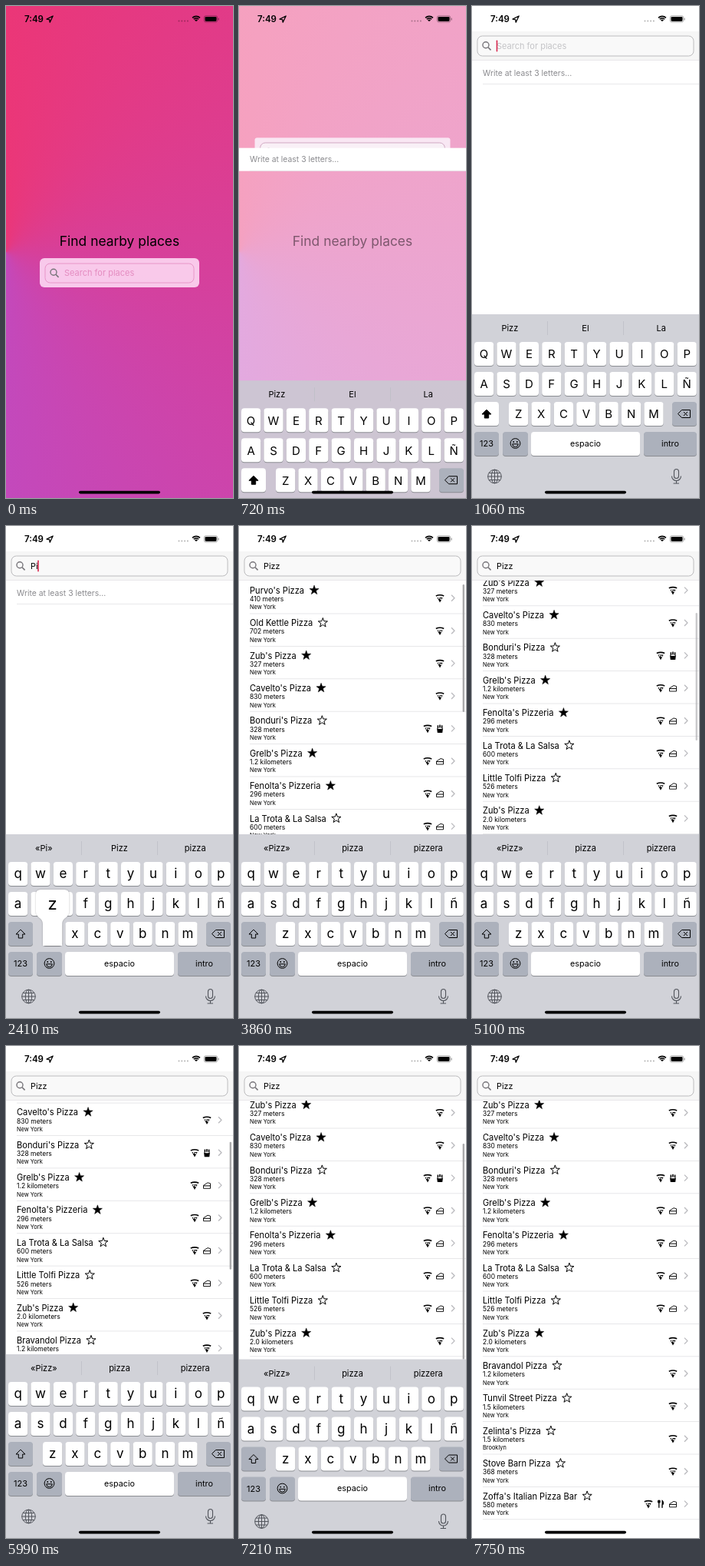
These frames come from a looping animation (296x640 px, 8 s). An HTML page with a canvas:

```html
<!DOCTYPE html>
<html lang="en">
<head>
<meta charset="utf-8">
<title>Nearby places</title>
<style>
html, body { margin: 0; width: 100%; height: 100%; overflow: hidden; background: #fff; }
canvas { display: block; width: 296px; height: 640px; }
</style>
</head>
<body>
<canvas id="stage" width="296" height="640"></canvas>
<script>
const ctx = document.getElementById('stage').getContext('2d');
const W = 296, H = 640, LOOP = 8000, TAU = Math.PI * 2;
const FONT = 'Inter, "Liberation Sans", sans-serif';
const LIST_TOP = 72, ROW = 42.4, KEYS_TOP = 401;
ctx.lineJoin = 'round';

// Periods in which the screen refreshes: start, end, number of updates.
const REFRESH = [
  [500, 1060, 6], [1250, 1950, 7], [2080, 2190, 2], [2410, 2660, 3],
  [2800, 2800, 1], [2950, 2950, 1], [3100, 3300, 3], [3860, 4550, 7],
  [4670, 4900, 3], [5100, 5220, 2], [5760, 6240, 5], [6780, 6900, 2], [7110, 7750, 7]
];

// Name, starred, distance, icons (p pizza, f fries, s sandwich, k cutlery), city.
const PLACES = [
  ["Purvo's Pizza", 1, '410 meters', 'p'],
  ['Old Kettle Pizza', 0, '702 meters', 'p'],
  ["Zub's Pizza", 1, '327 meters', 'p'],
  ["Cavelto's Pizza", 1, '830 meters', 'p'],
  ["Bonduri's Pizza", 0, '328 meters', 'pf'],
  ["Grelb's Pizza", 1, '1.2 kilometers', 'ps'],
  ["Fenolta's Pizzeria", 1, '296 meters', 'ps'],
  ['La Trota & La Salsa', 0, '600 meters', 'ps'],
  ['Little Tolfi Pizza', 0, '526 meters', 'ps'],
  ["Zub's Pizza", 1, '2.0 kilometers', 'p'],
  ['Bravandol Pizza', 0, '1.2 kilometers', 'p'],
  ['Tunvil Street Pizza', 0, '1.5 kilometers', 'p'],
  ["Zelinta's Pizza", 0, '1.5 kilometers', 'p', 'Brooklyn'],
  ['Stove Barn Pizza', 0, '368 meters', 'p'],
  ["Zoffa's Italian Pizza Bar", 0, '580 meters', 'pks']
];

const QUERY = [[0, ''], [1250, 'P'], [2080, 'Pi'], [2530, 'Piz'], [2950, 'Pizz']];
const HINTS = [
  [0, ['Pizz', 'El', 'La']], [1480, ['«P»', 'Pizz', 'Para']], [2080, ['«Pi»', 'Pizz', 'pizza']],
  [2800, ['«Piz»', 'pizza', 'Pizz']], [3100, ['«Pizz»', 'pizza', 'pizzera']]
];
const SCROLL = [[3860, 0], [4200, 40], [4440, 80], [4670, 93.6], [4900, 95],
  [5700, 95], [5880, 115], [6000, 124.7], [6120, 126], [7060, 126], [7200, 91.8]];

const clamp = x => Math.min(1, Math.max(0, x));
const mix = (a, b, p) => a + (b - a) * p;
const ramp = (t, from, to) => clamp((t - from) / (to - from));
const ease = x => x * x * (3 - 2 * x);
const latest = (list, t) => list.filter(e => e[0] <= t).pop()[1];

function track(points, t) {
  const n = points.findIndex(p => p[0] > t);
  if (n === 0) return points[0][1];
  if (n < 0) return points[points.length - 1][1];
  const [a, b] = [points[n - 1], points[n]];
  return mix(a[1], b[1], ramp(t, a[0], b[0]));
}

function refreshTime(t) {
  const span = REFRESH.filter(s => s[0] <= t).pop();
  if (!span) return 0;
  const [from, to, count] = span;
  if (count === 1) return from;
  const gap = (to - from) / (count - 1);
  return from + gap * Math.min(count - 1, Math.floor((t - from + 12) / gap));
}

// y is the middle of the capital letters.
function text(str, x, y, size, color = '#000', align = 'left', weight = 400) {
  ctx.font = `${weight} ${size}px ${FONT}`;
  ctx.textAlign = align;
  ctx.fillStyle = color;
  ctx.fillText(str, x, y + size * 0.36);
}

function box(x, y, w, h, r, fill) {
  ctx.beginPath();
  ctx.roundRect(x, y, w, h, r);
  if (fill) { ctx.fillStyle = fill; ctx.fill(); }
}

function path(points, close) {
  ctx.beginPath();
  points.forEach(([x, y], i) => i ? ctx.lineTo(x, y) : ctx.moveTo(x, y));
  if (close) ctx.closePath();
}

function stroke(color = '#000', width = 1) {
  ctx.strokeStyle = color;
  ctx.lineWidth = width;
  ctx.stroke();
}

function fill(color = '#000') {
  ctx.fillStyle = color;
  ctx.fill();
}

function ring(x, y, r, from = 0, to = TAU) {
  ctx.beginPath();
  ctx.arc(x, y, r, from, to);
}

function at(x, y, draw) {
  ctx.save();
  ctx.translate(x, y);
  draw();
  ctx.restore();
}

function faded(alpha, draw) {
  if (alpha <= 0) return;
  ctx.save();
  ctx.globalAlpha = alpha;
  draw();
  ctx.restore();
}

const icons = {
  p() {
    ctx.beginPath();
    ctx.moveTo(-5.2, -3);
    ctx.quadraticCurveTo(0, -5.4, 5.2, -3);
    stroke('#000', 1.6);
    path([[-3.6, -1], [3.6, -1], [0, 5.6]], true);
    fill();
    for (const [x, y] of [[-1.3, 0.1], [1.2, 0.9]]) { ring(x, y, 1); fill('#fff'); }
  },
  f() {
    path([[-4, -0.6], [-1.6, 0.4], [1.6, 0.4], [4, -0.6], [3.2, 5.3], [-3.2, 5.3]], true);
    fill();
    for (let i = -1; i <= 1; i++) box(i * 2.6 - 0.8, -5 + Math.abs(i) * 0.6, 1.6, 3.8, 0.3, '#000');
  },
  s() {
    path([[-4.5, 0], [1, -3.5], [4.5, -2.5], [4.5, 4], [-4.5, 4]], true);
    stroke('#000', 0.9);
    path([[-4.5, 0.6], [4.5, 0.6]]);
    stroke('#000', 1);
  },
  k() {
    path([[-2.2, -5], [-2.2, 5]]);
    stroke('#000', 1.3);
    box(-4, -5, 3.6, 3.6, 1, '#000');
    path([[2, 5], [2, -5], [3.6, -2.5], [3.4, 0.5], [2, 0.5]], true);
    fill();
    stroke('#000', 0.9);
  }
};

function star(x, y, solid) {
  const points = Array.from({ length: 10 }, (_, i) => {
    const r = i % 2 ? 2.6 : 6.4, a = i * TAU / 10 - TAU / 4;
    return [x + r * Math.cos(a), y + r * Math.sin(a)];
  });
  path(points, true);
  if (solid) fill();
  stroke('#000', solid ? 0.5 : 1);
}

function statusBar() {
  text('7:49', 24, 17, 11.5, '#000', 'left', 600);
  path([[53, 17.2], [61.2, 13], [57.2, 21.2], [56.6, 17.7]], true);
  stroke('#000', 1.3);
  for (let i = 0; i < 4; i++) { ring(225.5 + i * 3.8, 19.5, 1); fill('rgba(0,0,0,.3)'); }
  for (const r of [2, 4.6, 7.2]) {
    ring(248, 20.6, r, -TAU * 0.37, -TAU * 0.13);
    stroke('#000', 1.7);
  }
  box(258.3, 12.7, 17.4, 8.4, 2.5);
  stroke('rgba(0,0,0,.4)', 0.8);
  box(259.5, 13.9, 15, 6, 1.4, '#000');
  box(276.6, 15.4, 1, 3, 0.5, 'rgba(0,0,0,.45)');
}

function backdrop(p) {
  ctx.fillStyle = '#fff';
  ctx.fillRect(0, 0, W, H);
  faded(1 - p, () => {
    const g = ctx.createConicGradient(Math.PI, 0, H / 2);
    g.addColorStop(0, 'rgb(255,45,85)');
    g.addColorStop(1, 'rgb(175,82,222)');
    ctx.fillStyle = g;
    ctx.fillRect(0, 0, W, H);
    text('Find nearby places', W / 2, 305.5, 17.4, '#000', 'center');
  });
}

function searchBar(p, query, caret) {
  const rect = [mix(44, 0, p), mix(328, 33, p), mix(208, W, p), mix(38, 37.5, p), mix(6, 0, p)];
  box(...rect, 'rgba(255,225,248,.85)');
  faded(p, () => box(...rect, '#f6f6f6'));

  const x = mix(51, 7, p), y = mix(335, 39, p), mid = mix(347.5, 52, p);
  box(x, y, mix(194, 282, p), mix(25, 26, p), 6.5);
  faded(p, () => fill('#f9f9f9'));
  stroke(`rgb(${mix(232, 188, p)},${mix(150, 188, p)},${mix(200, 190, p)})`, 1);

  const left = x + 25;
  ring(x + 11, mid - 1.2, 4);
  stroke('#77757a', 1.4);
  path([[x + 14, mid + 1.8], [x + 17.6, mid + 5.4]]);
  stroke('#77757a', 1.6);

  if (query) text(query, left, mid, 10.8);
  else text('Search for places', left, mid, 11, `rgb(${mix(228, 196, p)},${mix(140, 196, p)},${mix(192, 199, p)})`);
  if (caret) {
    ctx.font = `400 10.8px ${FONT}`;
    box(left + ctx.measureText(query).width - 0.3, mid - 7.5, 1.6, 15, 0.8, '#d8284f');
  }
  if (p === 1) {
    ctx.fillStyle = '#e2e2e4';
    ctx.fillRect(0, 70, W, 0.7);
  }
}

function hintRow(p) {
  const y = mix(312, LIST_TOP, p);
  faded(clamp(p * 2), () => {
    ctx.fillStyle = '#fff';
    ctx.fillRect(0, y, W, 30);
    text('Write at least 3 letters...', 14, y + 15, 10.4, '#8a8a8e');
    ctx.fillStyle = '#e4e4e6';
    ctx.fillRect(14, y + 29.2, W - 14, 0.8);
  });
}

function placeRow([name, starred, distance, kinds, city = 'New York'], y) {
  text(name, 14, y + 11.8, 11.1);
  star(27 + ctx.measureText(name).width, y + 11.5, starred);
  text(distance, 14, y + 23, 8.5);
  text(city, 14, y + 33.8, 7.4);
  [...kinds].forEach((k, i) => at(262 - (kinds.length - 1 - i) * 16, y + 22, icons[k]));
  path([[277, y + 17.8], [281, y + 21.8], [277, y + 25.8]]);
  stroke('#b9b9bd', 1.3);
  ctx.fillStyle = '#e2e2e4';
  ctx.fillRect(14, y + ROW - 0.8, W - 14, 0.8);
}

function results(t, bottom) {
  const scroll = track(SCROLL, t);
  ctx.save();
  ctx.beginPath();
  ctx.rect(0, LIST_TOP - 2, W, bottom - LIST_TOP + 2);
  ctx.clip();
  PLACES.forEach((place, i) => {
    const y = LIST_TOP + i * ROW - scroll;
    if (y > 0 && y < bottom) placeRow(place, y);
  });
  const closing = t >= 7110;
  const visible = t < 3850 ? 0
    : t < 5700 ? 1 - ramp(t, 5040, 5200)
    : t < 7000 ? 1 - ramp(t, 6110, 6230)
    : 1 - ramp(t, 7400, 7740);
  faded(visible, () => box(291.6, closing ? 127 : 76 + scroll * 0.39, 2.4, closing ? 400 : 166, 1.2, '#a9a9ab'));
  ctx.restore();
}

function key(x, y, w, color = '#fff') {
  box(x, y + 1, w, 31, 4, '#8b8d92');
  box(x, y, w, 31, 4, color);
}

const KEY_W = 25.2, PITCH = 29.4, GREY = '#acb1bc';
const KEY_ROWS = [['qwertyuiop', 3, 437], ['asdfghjklñ', 3, 476], ['zxcvbnm', 48, 515]];

function popup(letter) {
  const [keys, left, y] = KEY_ROWS.find(r => r[0].includes(letter));
  const x = left + keys.indexOf(letter) * PITCH, r = x + KEY_W;
  ctx.save();
  ctx.shadowColor = 'rgba(0,0,0,.3)';
  ctx.shadowBlur = 2;
  ctx.beginPath();
  ctx.moveTo(x - 3, y - 42);
  ctx.lineTo(r + 3, y - 42);
  ctx.quadraticCurveTo(r + 9, y - 42, r + 9, y - 36);
  ctx.lineTo(r + 9, y - 13);
  ctx.bezierCurveTo(r + 9, y - 5, r, y - 6, r, y + 3);
  ctx.lineTo(r, y + 31);
  ctx.lineTo(x, y + 31);
  ctx.lineTo(x, y + 3);
  ctx.bezierCurveTo(x, y - 6, x - 9, y - 5, x - 9, y - 13);
  ctx.lineTo(x - 9, y - 36);
  ctx.quadraticCurveTo(x - 9, y - 42, x - 3, y - 42);
  fill('#fff');
  ctx.restore();
  text(letter, x + KEY_W / 2, y - 23.5, 22, '#000', 'center');
}

function shiftKey(upper) {
  key(3, 515, 32, upper ? '#fff' : GREY);
  path([[19, 525], [25, 531], [21.7, 531], [21.7, 536], [16.3, 536], [16.3, 531], [13, 531]], true);
  if (upper) fill();
  stroke('#000', 1);
}

function deleteKey() {
  key(261, 515, 32, GREY);
  path([[268.5, 530.5], [273.5, 525.5], [284.5, 525.5], [284.5, 535.5], [273.5, 535.5]], true);
  stroke('#000', 1);
  path([[276, 528], [281, 533]]);
  stroke('#000', 1);
  path([[281, 528], [276, 533]]);
  stroke('#000', 1);
}

function emojiKey() {
  key(40, 554, 33, GREY);
  ring(56.5, 569, 6.4);
  stroke('#000', 1);
  for (const x of [54.2, 58.8]) { ring(x, 567, 0.9); fill(); }
  ring(56.5, 569.8, 3.8, 0, Math.PI);
  ctx.closePath();
  stroke('#000', 1);
}

function globe() {
  const color = '#50535a';
  ring(29.5, 612, 8.8);
  stroke(color, 1);
  ctx.beginPath();
  ctx.ellipse(29.5, 612, 4.2, 8.8, 0, 0, TAU);
  stroke(color, 1);
  path([[29.5, 603.2], [29.5, 620.8]]);
  stroke(color, 1);
  for (const [y, half] of [[607.5, 7.5], [612, 8.8], [616.5, 7.5]]) {
    path([[29.5 - half, y], [29.5 + half, y]]);
    stroke(color, 1);
  }
}

function microphone() {
  const color = '#50535a';
  box(263.5, 602.5, 6, 12, 3);
  stroke(color, 1.1);
  ring(266.5, 611.5, 6, 0, Math.PI);
  stroke(color, 1.1);
  path([[266.5, 617.5], [266.5, 621], [263, 621], [270, 621]]);
  stroke(color, 1.1);
}

function keyboard(t, offset) {
  const upper = t < 1360;
  at(0, offset, () => {
    ctx.fillStyle = 'rgba(201,203,210,.85)';
    ctx.fillRect(0, KEYS_TOP, W, H - KEYS_TOP);
    latest(HINTS, t).forEach((word, i) => text(word, 49.3 + i * 98.7, 419, 11, '#000', 'center'));
    ctx.fillStyle = '#bdbfc6';
    for (const x of [98, 197]) ctx.fillRect(x, 410, 0.8, 18);

    for (const [keys, left, y] of KEY_ROWS) {
      [...keys].forEach((c, i) => {
        const x = left + i * PITCH;
        key(x, y, KEY_W);
        text(upper ? c.toUpperCase() : c, x + KEY_W / 2, y + (upper ? 16 : 15), upper ? 15 : 17, '#000', 'center');
      });
    }
    shiftKey(upper);
    deleteKey();
    key(3, 554, 32, GREY);
    text('123', 19, 569.5, 11, '#000', 'center');
    emojiKey();
    key(77, 554, 142);
    text('espacio', 148, 569, 10.8, '#000', 'center');
    key(224, 554, 69, GREY);
    text('intro', 258.5, 569, 10.8, '#000', 'center');
    globe();
    microphone();

    if (t >= 1700 && t < 1940) popup('i');
    if ((t >= 2410 && t < 2650) || (t >= 2800 && t < 3090)) popup('z');
  });
}

function caretOn(t) {
  if (t < 1000 || t >= 7110) return false;
  if (t < 3100) return true;
  const period = 1030;
  return (((t - 5180) % period) + period) % period < 620;
}

function draw(now) {
  const t = refreshTime(now % LOOP);
  const p = ease(ramp(t, 430, 995));
  const shown = ease(ramp(t, 430, 925)) - ease(ramp(t, 7163, 7706));
  const offset = (1 - shown) * (H - KEYS_TOP);

  backdrop(p);
  if (t >= 3100) results(t, KEYS_TOP + offset);
  searchBar(p, latest(QUERY, t), caretOn(t));
  if (p > 0 && t < 2800) hintRow(p);
  if (shown > 0) keyboard(t, offset);
  statusBar();
  box(95, 630.8, 106, 3.6, 1.8, '#000');
  requestAnimationFrame(() => draw(performance.now()));
}

draw(0);
</script>
</body>
</html>
```
